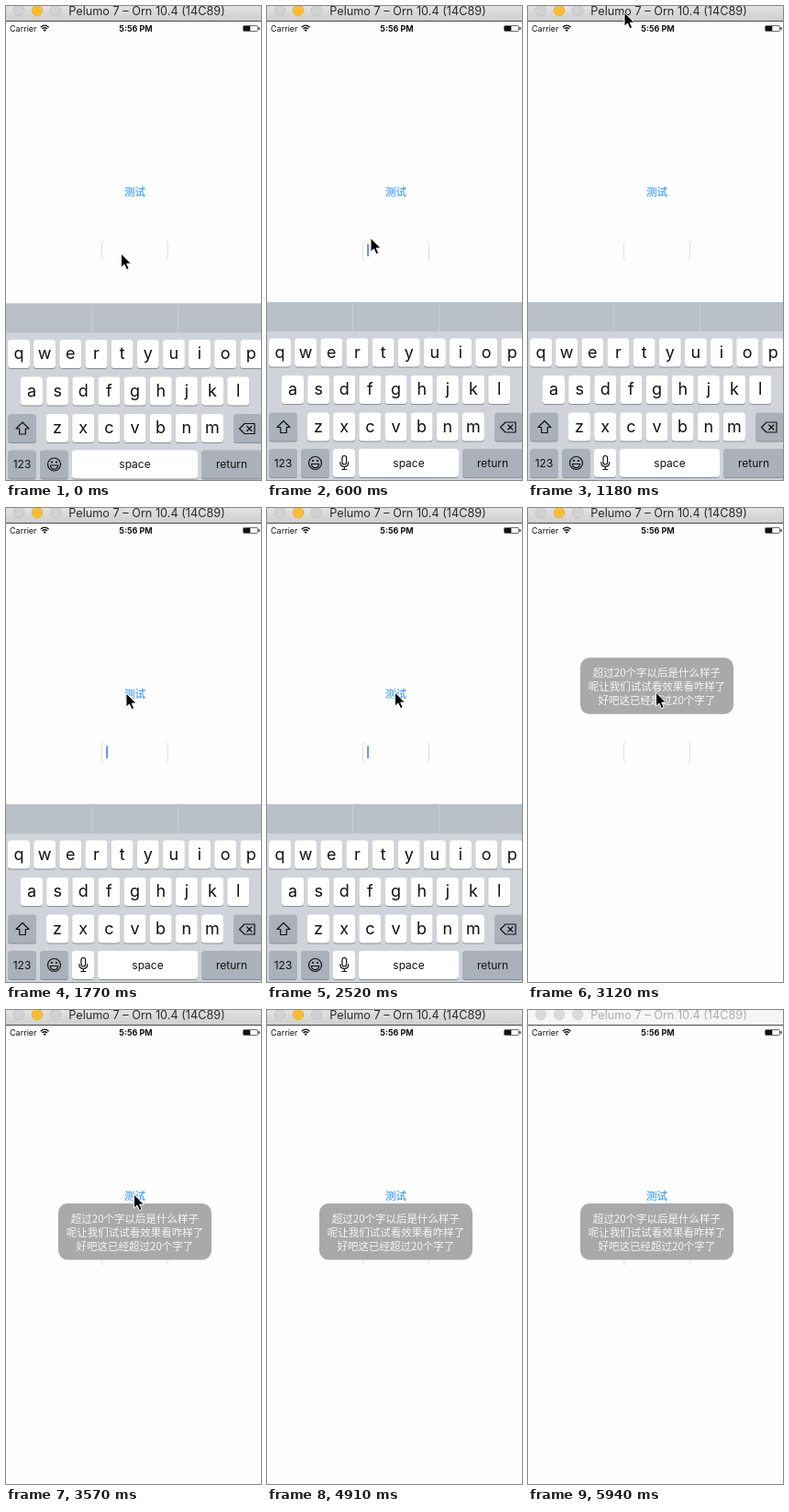
Recreate the animation shown at these times as an HTML page. Size 278 by 517 pixels, loop 6040 ms.

```html
<!DOCTYPE html>
<html lang="zh">
<head>
<meta charset="utf-8">
<style>
  html, body { margin: 0; width: 100%; height: 100%; overflow: hidden; background: #fefefe; }
  svg { display: block; width: 278px; height: 517px; font-family: Inter, Roboto, sans-serif; }
  .cjk { font-family: "Noto Sans CJK SC", "Noto Sans CJK", sans-serif; font-size: 11.5px; }
  .line { fill: none; stroke: #111; stroke-width: 1.2; stroke-linejoin: round; stroke-linecap: round; }
</style>
</head>
<body>
<svg viewBox="0 0 278 517" text-anchor="middle">
  <defs>
    <linearGradient id="chrome" x2="0" y2="1">
      <stop stop-color="#e2e2e2"/><stop offset="1" stop-color="#cfcfcf"/>
    </linearGradient>
  </defs>
  <rect width="278" height="517" fill="#fefefe"/>

  <rect id="bar" width="278" height="16"/>
  <g id="lights" stroke-width=".7">
    <circle cx="14" cy="5" r="5.8"/><circle cx="34" cy="5" r="5.8"/><circle cx="54" cy="5" r="5.8"/>
  </g>
  <text id="title" x="153.5" y="10" font-size="12.7">Pelumo 7 – Orn 10.4 (14C89)</text>
  <rect y="16" width="278" height="1" fill="#4b464b"/>

  <g font-size="9" fill="#111">
    <text x="4" y="27.6" text-anchor="start">Carrier</text>
    <text x="141.5" y="27.6" font-weight="700">5:56 PM</text>
    <path d="M37.8 23.2Q42.2 19 46.6 23.2M39.5 25Q42.2 22.6 44.9 25" fill="none" stroke="#111" stroke-width="1.3"/>
    <path d="M40.6 26.2Q42.2 25 43.8 26.2L42.2 27.9z"/>
    <rect x="258.5" y="21.5" width="16" height="6" rx="1" fill="none" stroke="#444" stroke-width=".8"/>
    <rect x="259" y="22" width="7.3" height="5"/>
    <rect x="275.4" y="23.2" width="1.2" height="2.6"/>
  </g>

  <text id="button" class="cjk" x="140.5" y="206.6" font-weight="500" fill="#1688ff">测试</text>
  <path d="M107 256.5Q104.5 256.5 104.5 259V275Q104.5 277.5 107 277.5M174 256.5Q176.5 256.5 176.5 259V275Q176.5 277.5 174 277.5"
    fill="none" stroke="#d8d8d8" stroke-width=".8"/>
  <rect id="caret" x="109.3" y="259.5" width="1.5" height="13.5" fill="#466bf0"/>

  <g id="keyboard"></g>

  <g id="toast" class="cjk" fill="#f6f6f6">
    <rect x="57" width="167" height="61.5" rx="10" fill="#a9a9a9"/>
    <text x="140.5" y="20.8">超过20个字以后是什么样子</text>
    <text x="140.5" y="35.8">呢让我们试试看效果看咋样了</text>
    <text x="140.5" y="50.8">好吧这已经超过20个字了</text>
  </g>

  <path id="cursor" d="M0 0V15.2L3.5 12L6 17.6L8.7 16.5L6.2 11.1H11z" fill="#000" stroke="#fff" stroke-width="1"/>
</svg>
<script>
const $ = id => document.getElementById(id);
const LOOP = 6040, GREY = '#abb1bb';

// Keyboard
const key = (x, y, w, label = '', fill = '#fff', size = 18) => `
  <rect x="${x}" y="${y + 1}" width="${w}" height="31" rx="3.5" fill="#888c92"/>
  <rect x="${x}" y="${y}" width="${w}" height="31" rx="3.5" fill="${fill}"/>
  <text x="${x + w / 2}" y="${y + (size > 15 ? 21 : 19.5)}" font-size="${size}" fill="#111">${label}</text>`;
const letterRow = (letters, x, y) =>
  [...letters].map((c, i) => key(x + i * 28.15, y, 24, c)).join('');

$('keyboard').innerHTML = `
  <rect y="323" width="278" height="200" fill="#d0d4da"/>
  <rect y="323" width="278" height="32" fill="#b9c0c8"/>
  <path d="M93.5 324V355M187.5 324V355" stroke="#c9ced5" stroke-width="1"/>
  ${letterRow('qwertyuiop', 2, 362.5)}
  ${letterRow('asdfghjkl', 16, 403)}
  ${key(2, 443.5, 31, '', GREY)}
  ${letterRow('zxcvbnm', 44, 443.5)}
  ${key(248, 443.5, 31, '', GREY)}
  ${key(2, 483, 31, '123', GREY, 12)}
  ${key(37, 483, 31, '', GREY)}
  <g id="wide">${key(72, 483, 137, 'space', '#fff', 12)}</g>
  <g id="split">
    ${key(72, 483, 24)}
    ${key(100, 483, 109, 'space', '#fff', 12)}
    <rect x="82" y="490.5" width="4.6" height="9.5" rx="2.3" class="line"/>
    <path class="line" d="M79.8 497.5Q79.8 502.5 84.3 502.5T88.8 497.5M84.3 502.5V505.5M81.8 505.5H86.8"/>
  </g>
  ${key(213, 483, 66, 'return', GREY, 12)}
  <path class="line" d="M18 452.5L25 459.5H21.3V465.5H14.7V459.5H11z"/>
  <path class="line" d="M254.5 459.5L260 454H271V465H260zM262.8 457L267.8 462M267.8 457L262.8 462"/>
  <circle class="line" cx="52.5" cy="498.5" r="7"/>
  <path class="line" d="M48.3 499.5H56.7Q56 503.7 52.5 503.7T48.3 499.5z"/>
  <circle cx="50" cy="496" r="1.1"/><circle cx="55" cy="496" r="1.1"/>`;

// Pointer positions, each held until the next: [ms, x, y]
const pointer = [
  [0, 125.5, 270], [600, 113, 253], [740, 82, 175], [890, 64, 75], [1040, 105, 7],
  [1190, 172, 40], [1340, 208, 118], [1480, 172, 180], [1630, 136, 203], [1770, 131, 202],
  [1920, 136, 202], [2070, 139.5, 201], [4470, 147, 235], [4620, 165, 325],
  [4770, 193, 447], [4910, -30, 0]
];

const within = (t, ...spans) => spans.some(([from, to]) => t >= from && t < to);
const show = (id, on) => $(id).setAttribute('visibility', on ? 'visible' : 'hidden');
const move = (id, x, y) => $(id).setAttribute('transform', `translate(${x} ${y})`);
const smooth = p => p * p * (3 - 2 * p);

function draw(t) {
  const active = t < 5940;
  $('bar').setAttribute('fill', active ? 'url(#chrome)' : '#f6f6f6');
  $('title').setAttribute('fill', active ? '#2a2a2a' : '#adadad');
  [...$('lights').children].forEach((light, i) => {
    const lit = active && i === 1;
    light.setAttribute('fill', lit ? '#ffbd2e' : active ? '#d2d2d2' : '#dadada');
    light.setAttribute('stroke', lit ? '#e2a32a' : active ? '#bbb' : '#cfcfcf');
  });

  $('button').setAttribute('opacity', within(t, [2370, 2520]) ? .3 : 1);
  show('caret', within(t, [150, 1040], [1480, 2070], [2370, 2820]));

  show('keyboard', t < 2970);
  move('keyboard', 0, t < 150 ? 1.5 : t < 2820 ? 0 : 187);
  $('wide').style.display = t < 150 ? '' : 'none';
  $('split').style.display = t < 150 ? 'none' : '';

  const step = Math.min(5, Math.max(0, Math.floor((t - 2820) / 150)));
  show('toast', t >= 2820);
  move('toast', 0, 137.5 + 73.5 * smooth(step / 5));

  const [, x, y] = pointer.findLast(([from]) => t >= from);
  move('cursor', x, y);
}

const start = performance.now();
function tick() {
  draw((performance.now() - start) % LOOP);
  requestAnimationFrame(tick);
}
tick();
</script>
</body>
</html>
```
